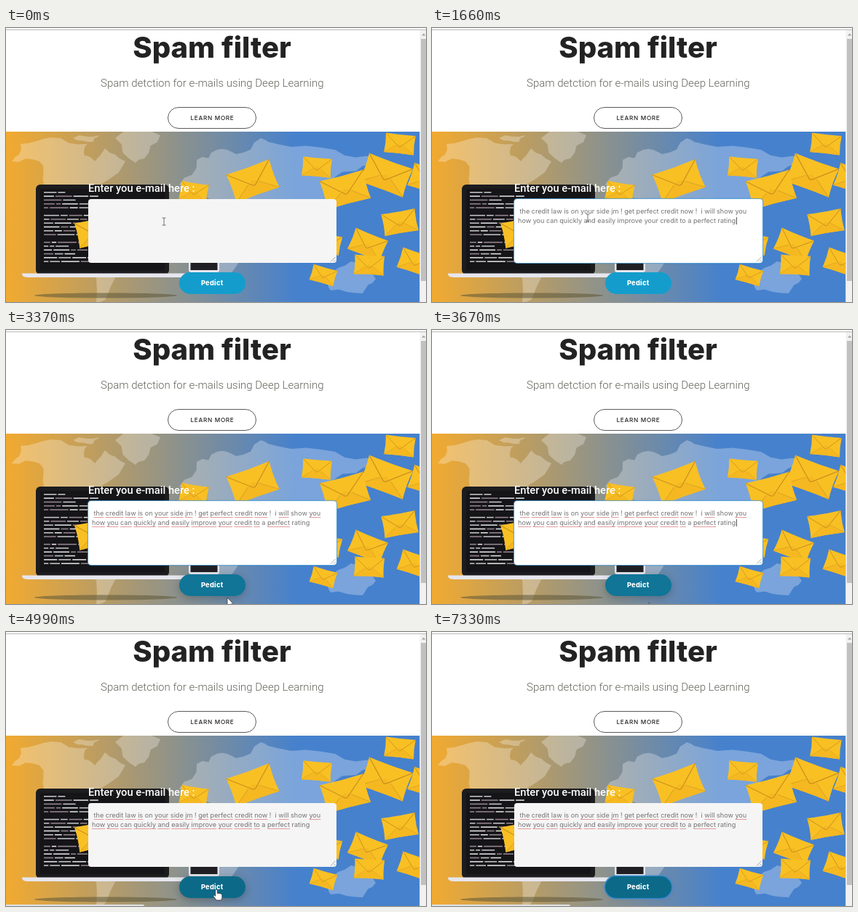
Animation, 577 px wide and 378 px high, one loop 8 s. Source, as an HTML page:

```html
<!DOCTYPE html>
<html lang="en">
<head>
<meta charset="utf-8">
<title>Spam filter</title>
<style>
  html, body { margin: 0; width: 100%; height: 100%; overflow: hidden; background: #fff; }
  #stage { position: relative; width: 577px; height: 378px; overflow: hidden; }
  svg, #stage div { position: absolute; }
  svg { left: 0; top: 0; width: 577px; height: 378px; }
  .title { font: 800 40px Inter, sans-serif; fill: #232323; }
  .sub { font: 300 15px Roboto, sans-serif; fill: #63645c; }
  .more { font: 500 8.2px Inter, sans-serif; letter-spacing: .7px; fill: #232323; }
  .label { font: 500 14.7px Roboto, sans-serif; fill: #fff; }
  .mid { text-anchor: middle; }
  #box { left: 113px; top: 236px; width: 341px; height: 88px; border-radius: 4px; background: #f5f5f5; }
  #mail { left: 118px; top: 246px; font: 9.1px/13.4px Inter, sans-serif; color: #737373; white-space: pre; }
  #marks { left: 0; top: 0; color: transparent; }
  #marks u { text-decoration: underline 1px #e29a9a; text-underline-offset: 1.5px; }
  .caret { width: 1px; height: 10px; background: #555; }
  #caretTop { left: 118px; top: 248px; }
  #caretEnd { left: 418px; top: 261px; }
  #button { left: 238px; top: 337px; width: 90.5px; height: 30px; border-radius: 15px; background: #149dcc;
    font: 800 9.2px/30px Inter, sans-serif; letter-spacing: .3px; color: #fff; text-align: center; }
  #status { left: 0; top: 376px; width: 190px; height: 3px; background: #dfe2e4; border-radius: 0 2px 0 0; }
</style>
</head>
<body>
<div id="stage">
  <svg>
    <defs>
      <linearGradient id="sky">
        <stop offset="0" stop-color="#f2aa30"/>
        <stop offset=".7" stop-color="#4681cd"/>
      </linearGradient>
      <clipPath id="hero"><path d="M0 143H568.500V378H0Z"/></clipPath>
    </defs>
    <path d="M0 2.500H577" stroke="#b9b9b9"/>
    <text class="title mid" x="283" y="41">Spam filter</text>
    <text class="sub mid" x="283.300" y="80.500">Spam detction for e-mails using Deep Learning</text>
    <rect x="222.500" y="109.500" width="121" height="29" rx="14.500" fill="#fff" stroke="#5a5a5a"/>
    <text class="more mid" x="283.500" y="127.300">LEARN MORE</text>

    <g clip-path="url(#hero)">
      <rect y="143" width="569" height="235" fill="url(#sky)"/>
      <g id="map" fill="#fff" fill-opacity=".28"></g>
      <ellipse cx="137" cy="369" rx="98" ry="3.500" fill="#5d5637" opacity=".55"/>
      <rect x="41" y="216" width="183" height="124" rx="6" fill="#1c1c1e"/>
      <rect x="47" y="222" width="171" height="112" fill="#151517"/>
      <g id="code"></g>
      <path d="M22 338.500H262V341Q261 344 256 344H30Q23 344 22 340Z" fill="#e6e6ee"/>
      <rect x="251" y="280" width="42" height="57" rx="3" fill="#e6e6ee"/>
      <rect x="253.500" y="283" width="37" height="51" fill="#202024"/>
      <g id="letters"></g>
    </g>
    <text class="label" x="113" y="225.500">Enter you e-mail here :</text>

    <path d="M568.500 3H577V378H568.500Z" fill="#f1f1f1"/>
    <path d="M570 15H577V349H570Z" fill="#c1c1c1"/>
    <path d="M571 10.500 573.800 7.500 576.500 10.500Z" fill="#a3a3a3"/>
  </svg>

  <div id="box"></div>
  <svg><path d="M446 322.500 452.500 316M450 322.500 452.500 320" stroke="#8d8d8d" stroke-width=".8"/></svg>
  <div id="mail"><span id="words"></span><div id="marks"></div></div>
  <div class="caret" id="caretTop"></div>
  <div class="caret" id="caretEnd"></div>
  <div id="button">Pedict</div>
  <div id="status"></div>

  <svg>
    <g fill="#dcd800">
      <circle id="clickBox" cx="214" cy="262" r="10"/>
      <circle id="clickButton" cx="287.500" cy="352.500" r="10"/>
    </g>
    <g id="mouse" fill="#fff" stroke="#333" stroke-width=".8">
      <path id="ibeam" d="M-2.500 -5H2.500M0 -5V5M-2.500 5H2.500" stroke="#555"/>
      <path id="arrow" d="M0 0V12L2.700 9.600 4.600 14 6.700 13.100 4.800 8.900H8.500Z"/>
      <path id="hand" d="M-1.300 1Q0 -1 1.300 1V5.500Q7.500 5 7.900 8V11.500L6.600 15H-.2Q-1.200 12.500 -4 9.800 -4.600 7.600 -2.700 8.100L-1.300 9.400Z"/>
    </g>
  </svg>
</div>
<script>
const LOOP = 8000;
const $ = id => document.getElementById(id);

let seed = 11;
const rand = () => (seed = seed * 16807 % 2147483647) / 2147483647;

function add(parent, tag, attrs) {
  const el = document.createElementNS('http://www.w3.org/2000/svg', tag);
  for (const k in attrs) el.setAttribute(k, attrs[k]);
  return parent.appendChild(el);
}

// Split each side of an outline at a shifted midpoint to get a ragged coast
const ragged = pts => pts.flatMap(([x, y], i) => {
  const [u, v] = pts[(i + 1) % pts.length], k = (rand() - .5) * .35;
  return [[x, y], [(x + u) / 2 + (v - y) * k, (y + v) / 2 - (u - x) * k]];
});

[
  '8,184 20,160 62,151 112,160 108,176 122,184 136,166 164,184 118,236 52,216 46,184',
  '92,152 128,148 120,157',
  '150,152 212,148 190,180 178,186',
  '112,290 140,292 170,316 138,372 124,378 104,320',
  '238,216 262,182 290,168 316,174 350,152 372,160 452,168 510,184 470,198 446,214 400,290 360,280 300,244',
  '234,242 300,248 334,274 300,350 286,366 262,296 230,270',
  '440,344 474,322 498,328 508,346 490,366 446,362'
].forEach(outline => {
  const pts = outline.split(' ').map(p => p.split(',').map(Number));
  add($('map'), 'polygon', { points: ragged(ragged(pts)).join(' ') });
});

// Lines of code on the laptop screen
for (let row = 0; row < 20; row++) {
  if (row % 7 === 5) continue;
  const end = 75 + rand() * 55;
  for (let x = 52, w; x < end; x += w + 2) {
    w = 6 + rand() * 20;
    const fill = ['#e8e8ea', '#c9c9cf', '#9a8794'][Math.floor(rand() * 3)];
    add($('code'), 'rect', { x, y: 226 + row * 5.3, width: w, height: 1.5, fill });
  }
}

// Envelope with slightly pinched sides
function envelope(x, y, w, turn) {
  const g = add($('letters'), 'g', { transform: `translate(${x} ${y}) rotate(${turn}) scale(${w / 40})`, fill: 'none' });
  add(g, 'path', { d: 'M-20 -13Q0 -12 20 -13 18.500 0 20 13 0 12 -20 13 -18.500 0 -20 -13Z', fill: '#f9c024' });
  add(g, 'path', { d: 'M-20 13 0 -1 20 13Q0 12 -20 13Z', fill: '#f5b821' });
  add(g, 'path', { d: 'M-20 13 -5 2M20 13 5 2', stroke: '#dda422', 'stroke-width': .7 });
  add(g, 'path', { d: 'M-20 -13 -2 3Q0 5 2 3L20 -13', stroke: '#c9921d', 'stroke-width': .8 });
}

[
  [124, 281, 54, -12], [258, 226, 38, 9], [339, 211, 63, -20], [427, 192, 40, 5],
  [440, 297, 40, 12], [522, 203, 64, 20], [466, 223, 62, -15], [541, 160, 41, 6],
  [580, 209, 50, 18], [541, 268, 47, -10], [497, 299, 48, 22], [499, 327, 41, 3],
  [436, 341, 34, 16], [562, 323, 44, 18]
].forEach(e => envelope(...e));

// Pasted mail and its spelling marks
const mail = ' the credit law is on your side jm ! get perfect credit now !  i will show you\n' +
  'how you can quickly and easily improve your credit to a perfect rating';
$('words').textContent = mail;
$('marks').innerHTML = mail.replace(/[a-z]+/g, w =>
  /^(on|i|a|show|rating)$/.test(w) ? w : `<u>${w}</u>`);

function play(el, steps, easing = 'linear') {
  const frames = steps.map(([ms, style]) => ({ offset: ms / LOOP, easing, ...style }));
  frames.push({ ...frames[frames.length - 1], offset: 1 });
  el.animate(frames, { duration: LOOP, iterations: Infinity });
}

// Hidden at first, then switched at each given time
function toggle(el, times, on = 1) {
  play(el, [[0, { opacity: 0 }], ...times.map((ms, i) => [ms, { opacity: i % 2 ? 0 : on }])], 'steps(1)');
}

function blink(el, start, end, period = 305) {
  const times = [];
  for (let ms = start; ms < end; ms += period) times.push(ms);
  toggle(el, times.length % 2 ? [...times, end] : times);
}

// Mouse: each move runs from one time to another and ends at a point
const at = (x, y) => ({ transform: `translate(${x}px, ${y}px)` });
let pos = at(217, 267);
const path = [[0, pos]];
[
  [120, 200, 214, 262], [1980, 2750, 344, 332], [2830, 3370, 304, 369], [3370, 3600, 298, 376],
  [3670, 3820, 289, 355], [5930, 6230, 342, 371], [6230, 6710, 360, 347], [7180, 7330, 383, 393]
].forEach(([from, to, x, y]) => {
  path.push([from, pos], [to, pos = at(x, y)]);
});
play($('mouse'), path);

const enter = 3030, leave = 3340, back = 3740, away = 6130, overPage = 2640;
play($('ibeam'), [[0, { opacity: 1 }], [overPage, { opacity: 0 }]], 'steps(1)');
toggle($('arrow'), [overPage, enter, leave, back, away]);
toggle($('hand'), [enter, leave, back, away]);

const focusAt = 490, pasteAt = 1660, clickAt = 4220;
toggle($('clickBox'), [focusAt, focusAt + 150], .65);
toggle($('clickButton'), [clickAt, clickAt + 180], .65);
toggle($('words'), [pasteAt]);
toggle($('marks'), [pasteAt + 80]);
blink($('caretTop'), focusAt + 70, pasteAt);
blink($('caretEnd'), pasteAt, clickAt);
toggle($('status'), [4920]);

const field = (backgroundColor, glow) => ({
  backgroundColor, boxShadow: `0 0 0 1px rgba(90,165,215,${glow}), 0 0 3px rgba(20,120,204,${glow * .6})`
});
const idle = field('#f5f5f5', 0), focus = field('#ffffff', .8);
play($('box'), [[0, idle], [focusAt, idle], [750, focus], [clickAt, focus],
  [clickAt + 70, field('#f5f5f5', .5)], [clickAt + 220, idle]]);

const look = (backgroundColor, shade, ring) => ({
  backgroundColor, boxShadow: `0 3px 12px rgba(0,0,0,${shade}), 0 0 0 1.5px rgba(50,140,215,${ring})`
});
const plain = look('#149dcc', 0, 0), hover = look('#107597', .22, 0), dark = look('#0c6a88', .25, 0);
play($('button'), [[0, plain], [enter, plain], [enter + 250, hover], [3670, hover], [3820, dark],
  [6300, dark], [6600, look('#0c6a88', .05, .9)]]);
</script>
</body>
</html>
```
